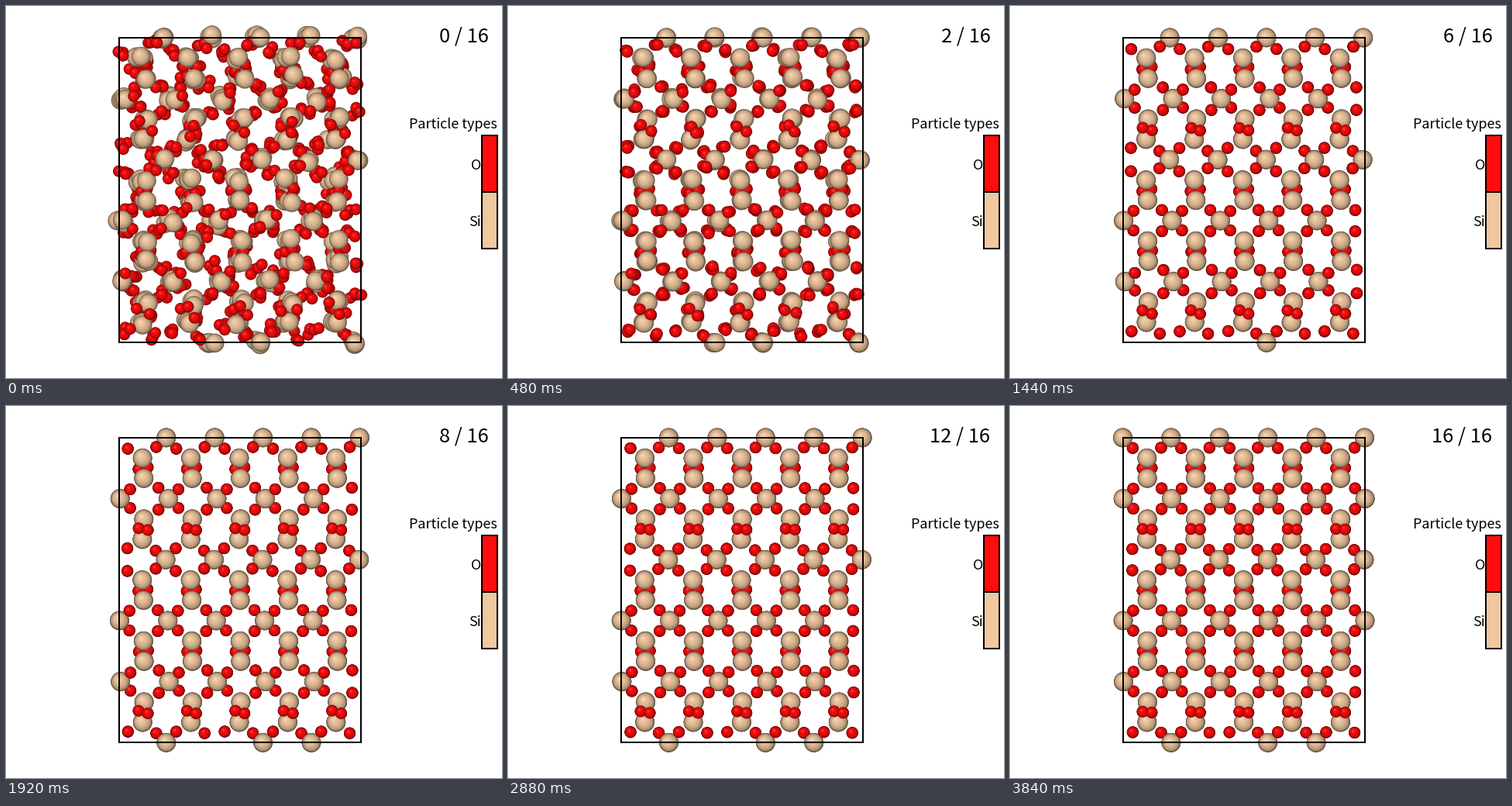
Write a matplotlib script that moves like this. It is 640x480 px and loops after 4.08 s.

```python
import matplotlib.pyplot as plt
import numpy as np
from matplotlib.animation import FuncAnimation
from matplotlib.patches import Rectangle

WIDTH, HEIGHT, DPI = 640, 480, 100
POINT = 72 / DPI
LEFT, RIGHT, TOP, BOTTOM = 145.8, 457.8, 40.9, 434.3
COLS, ROWS, LAYERS, LAST = 5, 5, 4, 16
CELL_X, CELL_Y = (RIGHT - LEFT) / COLS, (BOTTOM - TOP) / ROWS
RADIUS = {"O": 7.5, "Si": 12.3}
COLOR = {"O": (1.0, 0.05, 0.05), "Si": (0.941, 0.784, 0.627)}
RINGS = 12
FONT = "Noto Sans CJK JP"

# Sideways start of each row of tetrahedra and how slowly (in steps) it relaxes.
SWAY = (-6.0, 6.0, -5.0, 1.5, 5.6)
SETTLE = (5.5, 5.5, 9.0, 9.0, 7.5)
DISORDER_TAU = 2.0

rng = np.random.default_rng(12)
atoms = []


def always(n):
    return True


def add(kind, x, y, z, shift, tau, shown=always):
    """Add one column of atoms, leaning and scattered from back to front."""
    spread = (2.3, 1.8) if kind == "Si" else (4.2, 3.2)
    for layer in range(LAYERS):
        lean = 5 * layer / (LAYERS - 1) - 3
        jitter = rng.normal((lean, 0), spread)
        atoms.append((layer, z, kind, (x, y), shift, tau, jitter, shown))


def side_shown(row, k):
    """A corner atom sits on the side its row sways into, on both once settled."""
    def shown(n):
        drift = SWAY[row] * np.exp(-n / SETTLE[row])
        return abs(drift) < 0.35 or (drift > 0) == (k == 0)
    return shown if k in (0, COLS) else always


def bottom_shown(k):
    """Top-row atoms wrap to the bottom edge: some always, some early, some late."""
    def shown(n):
        return k > 0 and (k % 3 == 0 or (n < 6 if k % 3 == 2 else n > 6))
    return shown


def add_tetrahedra(row, y, at_bottom=False):
    shift, tau = SWAY[row], SETTLE[row]
    for k in range(COLS + 1):
        x = LEFT + k * CELL_X
        add("Si", x, y, 1, (shift, 0), tau,
            bottom_shown(k) if at_bottom else side_shown(row, k))
        for sx in (-1, 1):
            for sy in (-1, 1):
                ox, oy = x + 12.9 * sx, y + 13.1 * sy
                if LEFT < ox < RIGHT and TOP < oy < BOTTOM:
                    turn = -0.75 * sx * sy * shift
                    add("O", ox, oy, 0 if sx == sy else 2, (shift, turn), tau)


def add_pairs(row):
    """Si pairs follow the rows above and below; the O between them tilt along."""
    below = (row + 1) % ROWS
    upper, lower = 0.6 * SWAY[row], 0.55 * SWAY[below]
    tilt = 0.75 * (lower - upper)
    y = TOP + (row + 0.5) * CELL_Y
    for k in range(COLS):
        x = LEFT + (k + 0.5) * CELL_X
        add("Si", x, y - 13, 1, (upper, 0), SETTLE[row])
        add("Si", x, y + 13, 1, (lower, 0), SETTLE[below])
        for side in (-1, 1):
            move = ((upper + lower) / 4, -side * tilt)
            add("O", x + 5.8 * side, y, 2 if tilt < 0 else 0, move, SETTLE[row])


def sphere_rings(kind):
    """Nested discs that shade one ball: radii, centre offsets and colours."""
    t = np.linspace(0, 0.92, RINGS)
    rho = 1 - t
    light = 0.45 + 0.55 * np.sqrt(1 - rho**2)
    gloss = 0.35 * np.clip(1 - rho / 0.32, 0, 1)
    rgb = np.outer(light, COLOR[kind])
    rgb += gloss[:, None] * (1 - rgb)
    radius = RADIUS[kind]
    return rho * radius, np.outer(t, (-0.28, -0.32)) * radius, rgb


for row in range(ROWS):
    add_tetrahedra(row, TOP + row * CELL_Y)
    add_pairs(row)
add_tetrahedra(0, BOTTOM, at_bottom=True)
atoms.sort(key=lambda atom: atom[:2])

kinds = [atom[2] for atom in atoms]
home, shifts, taus, jitters = (np.array([atom[i] for atom in atoms]) for i in (3, 4, 5, 6))
balls = {kind: sphere_rings(kind) for kind in RADIUS}
ring_radii = np.concatenate([balls[kind][0] for kind in kinds])
ring_offsets = np.array([balls[kind][1] for kind in kinds])
ring_colors = np.concatenate([balls[kind][2] for kind in kinds])

fig = plt.figure(figsize=(WIDTH / DPI, HEIGHT / DPI), dpi=DPI, facecolor="white")
ax = fig.add_axes([0, 0, 1, 1])
ax.set_xlim(0, WIDTH)
ax.set_ylim(HEIGHT, 0)
ax.axis("off")


def outlined_box(x, y, w, h, fill="none"):
    ax.add_patch(Rectangle((x, y), w, h, facecolor=fill, edgecolor="black",
                           linewidth=2 * POINT, joinstyle="miter", zorder=5))


def label(x, y, text, size):
    return ax.text(x, y, text, family=FONT, fontsize=size * POINT, ha="right",
                   va="baseline", color="black", zorder=6)


rings = ax.scatter(np.zeros(len(ring_radii)), np.zeros(len(ring_radii)),
                   s=(2 * ring_radii * POINT) ** 2, c=ring_colors, linewidths=0, zorder=2)
outlined_box(LEFT, TOP, RIGHT - LEFT, BOTTOM - TOP)
outlined_box(614, 167, 20, 73, COLOR["O"])
outlined_box(614, 240, 20, 73, COLOR["Si"])
label(634, 158.5, "Particle types", 18)
label(613.5, 211, "O", 18)
label(612.5, 283.5, "Si", 18)
counter = label(622.5, 46.5, "", 25.4)


def update(n):
    pos = home + shifts * np.exp(-n / taus)[:, None] + jitters * np.exp(-n / DISORDER_TAU)
    pos[[not atom[7](n) for atom in atoms]] = -100
    rings.set_offsets((pos[:, None, :] + ring_offsets).reshape(-1, 2))
    counter.set_text(f"{n} / {LAST}")
    return rings, counter


animation = FuncAnimation(fig, update, frames=LAST + 1, interval=240, repeat=True,
                          repeat_delay=0, blit=False)
plt.show()
```
